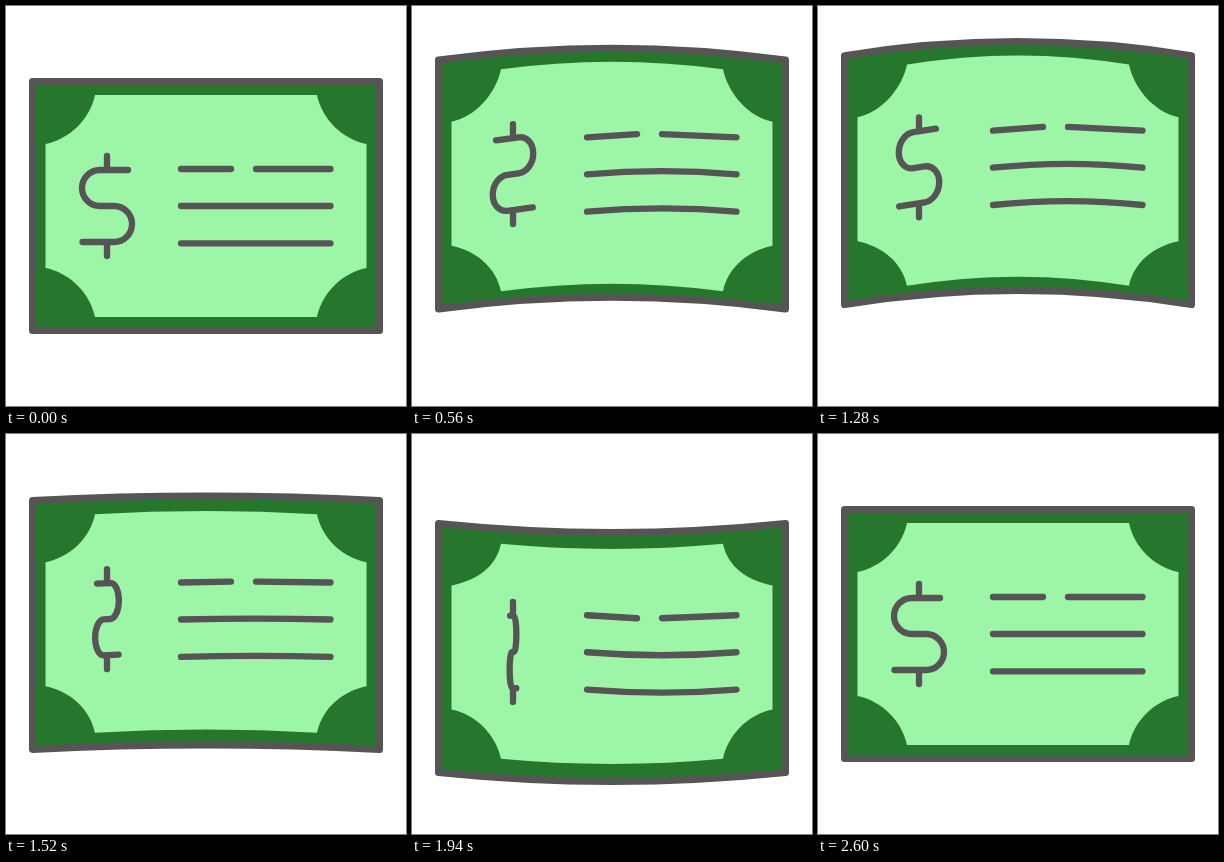
These frames come from a looping animation (400 px wide and 400 px high, 2630 ms). An HTML page with a canvas:

```html
<!DOCTYPE html>
<html lang="en">
<head>
<meta charset="utf-8">
<title>Waving banknote</title>
<style>
  html, body { margin: 0; width: 100%; height: 100%; overflow: hidden; background: #fff; }
  canvas { display: block; width: 400px; height: 400px; }
</style>
</head>
<body>
<canvas id="stage" width="400" height="400"></canvas>
<script>
const ctx = document.getElementById('stage').getContext('2d');
const LOOP = 2630, REST = 200, STEP = 30;
const INK = '#575456', DARK = '#26772d', LIGHT = '#9df5a7';

const ramp = (n, from, to) => Math.min(1, Math.max(0, (n - from) / (to - from)));
const smooth = s => s * s * (3 - 2 * s);

// Weights of the raised and lowered poses at a given step
function poseAt(n) {
  const s = ramp(n, 0, 24.5);
  const rise = Math.sin(s * Math.PI / 2) - 0.02 * Math.sin(s * Math.PI * 2);
  const fall = smooth(ramp(n, 30, 58.5));
  const settle = smooth(ramp(n, 61, 80));
  return { up: rise * (1 - fall), down: fall * (1 - settle) };
}

// Two full turns with a short pause between them
const turnAt = n => 2 * Math.PI * (ramp(n, 0, 30) + ramp(n, 32.5, 67.5));

// Quadratic curve that passes through midY halfway to (x, y)
function bow(x0, y0, midY, x, y) {
  ctx.quadraticCurveTo((x0 + x) / 2, 2 * midY - (y0 + y) / 2, x, y);
}

function stroke(width) {
  ctx.lineWidth = width;
  ctx.strokeStyle = INK;
  ctx.stroke();
}

function drawBill(mix) {
  const edge = mix(-31, 14), mid = mix(-48, 23);
  const top = 75.5, bottom = 324.5, left = 26.5, right = 373.5;
  ctx.beginPath();
  ctx.moveTo(left, top + edge);
  bow(left, top + edge, top + mid, right, top + edge);
  ctx.lineTo(right, bottom + edge);
  bow(right, bottom + edge, bottom + mid, left, bottom + edge);
  ctx.closePath();
  ctx.fillStyle = DARK;
  ctx.fill();
  stroke(7);
}

function drawPanel(mix) {
  const side = mix(-32, 13.5), mid = mix(-48, 22.5);
  const corner = mix(-37, 17.3), inset = mix(0, 3.5);
  const t = 89 + inset, b = 311 - inset;
  const tc = t + corner, bc = b + corner;
  const ts = 138 + side, bs = 262 + side;
  ctx.beginPath();
  ctx.moveTo(89, tc);
  bow(89, tc, t + mid, 311, tc);
  ctx.bezierCurveTo(316, tc + 24, 336, ts - 5, 360.5, ts);
  ctx.lineTo(360.5, bs);
  ctx.bezierCurveTo(336, bs + 5, 316, bc - 24, 311, bc);
  bow(311, bc, b + mid, 89, bc);
  ctx.bezierCurveTo(84, bc - 24, 64, bs + 5, 39.5, bs);
  ctx.lineTo(39.5, ts);
  ctx.bezierCurveTo(64, ts - 5, 84, tc + 24, 89, tc);
  ctx.fillStyle = LIGHT;
  ctx.fill();
}

function drawLines(mix) {
  const end = mix(-45.6, 18.3), mid = mix(-50.3, 21.3);
  ctx.beginPath();
  ctx.moveTo(175, 163 + end);
  ctx.lineTo(225, 163 + mid);
  ctx.moveTo(250, 163 + mid);
  ctx.lineTo(324.5, 163 + end);
  for (const y of [200, 237.3]) {
    ctx.moveTo(175, y + end);
    bow(175, y + end, y + mid, 324.5, y + end);
  }
  stroke(6.3);
}

function drawDollar(mix, turn) {
  const k = Math.cos(turn), slope = mix(-0.19, 0.09);
  ctx.save();
  ctx.transform(k, slope * k, 0, 1, 101, 200 + mix(-46, 18));
  ctx.beginPath();
  ctx.moveTo(21, -36);
  ctx.lineTo(-7, -36);
  ctx.arc(-7, -18, 18, -Math.PI / 2, Math.PI / 2, true);
  ctx.lineTo(7, 0);
  ctx.arc(7, 18, 18, -Math.PI / 2, Math.PI / 2);
  ctx.lineTo(-24.5, 36);
  ctx.moveTo(0, -50);
  ctx.lineTo(0, -36);
  ctx.moveTo(0, 36);
  ctx.lineTo(0, 50);
  ctx.restore(); // keeps the line weight even while the sign turns
  stroke(6.3);
}

function draw(ms) {
  const n = Math.max(0, Math.floor((ms % LOOP - REST) / STEP));
  const { up, down } = poseAt(n);
  const mix = (high, low) => high * up + low * down;
  ctx.fillStyle = '#fff';
  ctx.fillRect(0, 0, 400, 400);
  ctx.lineCap = ctx.lineJoin = 'round';
  drawBill(mix);
  drawPanel(mix);
  drawLines(mix);
  drawDollar(mix, turnAt(n));
}

function tick() {
  draw(performance.now());
  requestAnimationFrame(tick);
}
tick();
</script>
</body>
</html>
```
